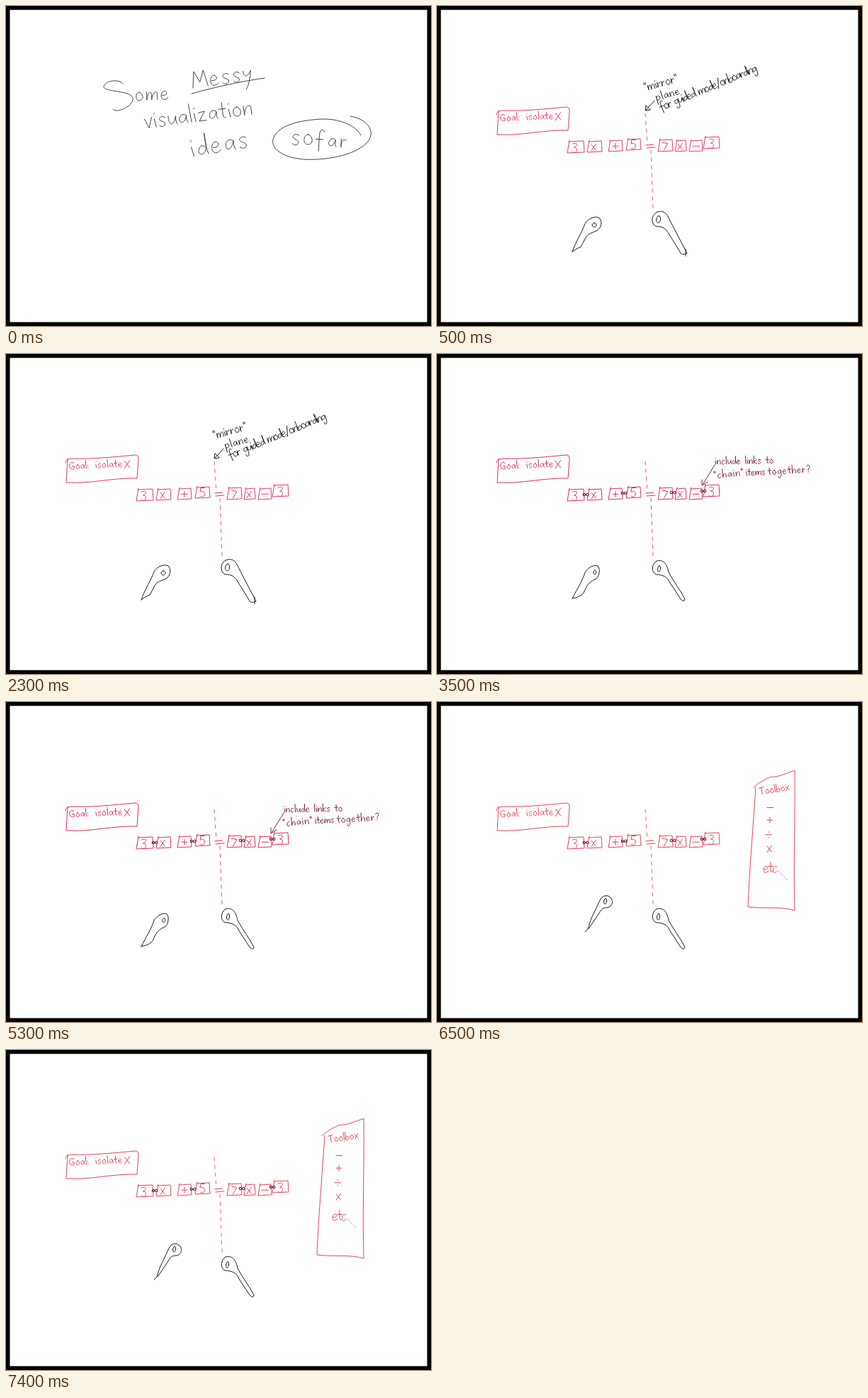
An HTML page for the animation above (8 s loop, 600 by 453 pixels).

```html
<!DOCTYPE html>
<html lang="en">
<head>
<meta charset="utf-8">
<title>Sketch slides</title>
<style>
  html, body { margin: 0; height: 100%; overflow: hidden; background: #000; }
  svg { display: block; width: 100%; height: 100%; }
  path { fill: none; stroke-linecap: round; stroke-linejoin: round; vector-effect: non-scaling-stroke; }
</style>
</head>
<body>
<svg id="stage" viewBox="0 0 600 453"></svg>
<script>
// Single-stroke handwriting: [width, path], baseline at 0, x-height 10.
const glyphs = {
  a: [8, 'M8-8C4-12 0-8 0-4S5 1 8-8Q7-1 9 0'],
  b: [8, 'M0-20V0C4 2 8-1 8-5S3-10 0-4'],
  c: [7, 'M7-9C2-12-1-5 1-1S5 0 7-2'],
  d: [8, 'M7-7C3-11 0-6 0-3S6 2 8-8V-20Q7-5 9 0'],
  e: [8, 'M1-5C5-4 8-6 6-9S-1-8 0-3S5 1 8-2'],
  f: [8, 'M9-17C6-22 3-18 3-12V6M-1-8H8'],
  g: [8, 'M8-8C4-12 0-8 0-4S6 0 8-8C8 4 7 9 4 9S0 7 1 5'],
  h: [8, 'M0-20V0C1-8 7-13 8-6V0'],
  i: [1, 'M0-9L1 0M0-14L1-15'],
  k: [7, 'M0-20V0M7-10L0-5L7 0'],
  l: [1, 'M0-20L1 0'],
  m: [13, 'M0-10V0C1-9 6-13 6-6V0C7-9 13-13 13-6V0'],
  n: [8, 'M0-10V0C1-9 8-14 8-6V0'],
  o: [8, 'M5-10C-1-11-2 0 4 0S9-9 4-10'],
  p: [8, 'M0-10V9M0-7C3-12 8-10 8-6S3 1 0-2'],
  r: [6, 'M0-10V0C0-7 3-11 6-8'],
  s: [7, 'M7-9C4-12 0-9 1-7S8-4 6-1S1 0 0-1'],
  t: [6, 'M3-17V-2Q4 1 6-1M-1-10H7'],
  u: [8, 'M0-10C-1 2 5 2 8-9Q7-1 9 0'],
  v: [7, 'M0-10L4 0L8-11'],
  x: [8, 'M0-10L8 0M8-11L0 1'],
  y: [8, 'M0-10C0-3 4-3 8-10Q6 2 1 9'],
  z: [8, 'M0-9L7-10L0 0H8'],
  G: [12, 'M11-14C7-20 0-15 0-8S7 2 11-1V-7H6'],
  M: [15, 'M0 0L3-17L8-5L13-17L16 0'],
  T: [12, 'M0-16L12-18M6-17V0'],
  3: [8, 'M0-15C4-18 9-16 8-13S4-9 3-9C9-9 9-4 7-1S2 1 0-1'],
  5: [8, 'M8-16H1L0-9C5-11 9-8 8-4S3 1 0-1'],
  7: [9, 'M0-14L10-12L3 0'],
  '+': [10, 'M0-6H10M5-11V-1'],
  '-': [12, 'M0-6H12'],
  '÷': [10, 'M0-6H10M5-11v1M5-2v1'],
  ':': [1, 'M0-8v1M0-1v1'],
  '/': [7, 'M0 3L7-18'],
  '"': [3, 'M0-17V-13M3-17V-13'],
  '?': [7, 'M0-14C1-19 8-18 7-13S3-9 3-5M3-1v1'],
  ' ': [6, '']
};

const line = (d, extra = '') => `<path d="${d}" ${extra}/>`;

function write(text, x, y, scale, gap = 6, angle = 0) {
  let pen = 0, out = '';
  for (const ch of text) {
    const [width, d] = glyphs[ch];
    if (d) out += line(d, `transform="translate(${pen} 0)"`);
    pen += width + gap;
  }
  return `<g role="img" aria-label='${text}' transform="translate(${x} ${y}) rotate(${angle}) scale(${scale})">${out}</g>`;
}

const ink = (color, ...parts) => `<g stroke="${color}" stroke-width="1">${parts.join('')}</g>`;
const eye = (x, y, rx, ry) => line(`M${x} ${y - ry}a${rx} ${ry} 8 1 0 .1 0`);
const link = (x, y) => line(`M${x} ${y}c-5-6-5 6 0 0c5-6 5 6 0 0`, 'stroke-width="1.2"');

// Box x, y, width, height, then the symbol with its left edge and baseline.
const tiles = [
  [185, 191, 22, 17, '3', 191, 207], [213, 191, 19, 16, 'x', 218, 204],
  [243, 190, 18, 16, '+', 248, 203], [268, 188, 19, 16, '5', 274, 202],
  [313, 189, 19, 17, '7', 318, 204], [337, 190, 14, 16, 'x', 340, 203],
  [357, 190, 17, 16, '-', 361, 203], [377, 185, 21, 17, '3', 384, 201]
];
const tile = ([x, y, w, h, symbol, left, base]) =>
  line(`M${x + 1} ${y + 1}L${x + w} ${y}L${x + w + 1} ${y + h - 1}L${x - 1} ${y + h}L${x + 2} ${y - 1}`) +
  write(symbol, left, base, .78);

const equation = color => ink(color,
  write('Goal:', 90, 163, .57, 4, -3), write('isolate', 127, 161, .57, 4.2, -2), write('x', 167, 161, .95),
  line('M84 154Q83 148 95 148C120 149 150 146 182 143Q187 142 187 149L185 176C150 175 120 184 85 182L87 148'),
  tiles.map(tile).join(''),
  line('M295 197L306 196M296 201L308 200'),
  line('M294 152L297 196M302 204L305 287', 'stroke-dasharray="5 6" stroke-opacity=".8"'));

const links = ink('#7c2040', link(210, 199), link(264, 197), link(333, 196), link(376, 194));

const title = ink('#444',
  line('M165 110C160 103 140 105 138 114C137 122 178 119 179 131C180 142 155 153 151 146'),
  write('ome', 184, 134, 1.15, 5, -3), write('Messy', 264, 116, 1.35, 4.3, -8),
  line('M262 124C295 115 330 107 365 102'),
  write('visualization', 197, 173, 1.3, 3.7, -7.5), write('ideas', 264, 213, 1.5, 5, -10),
  write('so', 404, 196, 1.4, 5), write('far', 438, 198, 1.2, 6.5, 3),
  line('M486 156C512 160 524 180 508 195C490 212 450 219 420 217C385 214 372 198 378 186C386 167 420 161 448 160C476 160 496 172 501 183'));

const mirror = equation('#e23a62') + ink('#1a1a1a',
  write('"mirror"', 295, 120, .68, 3.2, -16), write('plane', 311, 134, .62, 5, -17),
  write('for guided mode/onboarding', 317, 148, .68, 1, -22.5),
  line('M307 134L295 147M295 141L294 148L301 147Z'),
  line('M191 348C196 333 205 320 209 308C214 300 224 297 229 300C234 305 232 314 226 318C217 322 213 322 210 328L203 341C198 343 195 345 191 348'),
  eye(222, 310, 3, 3),
  line('M310 292C302 296 302 308 309 312C319 312 323 315 327 322L343 348Q345 354 353 350L330 306C326 297 322 287 310 292M351 344V354'),
  eye(313, 302, 3, 5));

const rightWand = line('M310 293C303 297 302 309 309 312C320 313 325 315 329 324L344 347Q349 352 350 347C343 333 333 321 327 309C325 299 321 290 310 293');

const chain = equation('#dc2f58') + links + ink('#7c2040',
  write('include links to', 393, 156, .55, 3.8, -1), write('"chain"', 392, 176, .58, 5.2, -6),
  write('items', 437, 172, .55, 3, -3), write('together?', 468, 171, .58, 4.5, -4),
  line('M392 157L375 185M374 178V186L382 181')) + ink('#1a1a1a',
  line('M191 346C197 334 206 320 209 309C213 303 220 298 227 300C231 305 229 314 225 318C217 321 212 326 209 334Q206 344 191 346'),
  eye(223, 309, 2, 3), rightWand, eye(314, 304, 2, 4.5));

const toolbox = equation('#e34558') + links + ink('#e34558',
  line('M450 121C446 180 441 240 439 290C460 293 485 289 505 295C503 230 506 160 505 97C490 102 480 107 471 106C460 111 453 115 447 121'),
  write('Toolbox', 456, 131, .56, 3.6, -9),
  write('-', 466, 154, .75), write('+', 466, 172, .8), write('÷', 464, 193, .85), write('x', 466, 212, .8),
  write('etc', 461, 241, .85, .7), line('M482 239L494 252', 'stroke-dasharray="1 3"')) + ink('#1a1a1a',
  line('M209 325C215 322 214 315 218 306L230 281C232 275 239 272 244 276C250 281 248 289 241 291C234 291 232 293 229 299L214 321'),
  eye(238, 282, 2, 4), rightWand, eye(313, 304, 2, 4.5));

const stage = document.getElementById('stage');
stage.innerHTML = '<rect x="5.5" y="5.5" width="589" height="442" fill="#fff"/>' +
  [title, mirror, chain, toolbox].map(s => `<g class="slide">${s}</g>`).join('');

const slides = stage.querySelectorAll('.slide');
const ends = [500, 3500, 6500, 8000];

function show(now) {
  const current = ends.findIndex(end => now % 8000 < end);
  slides.forEach((slide, i) => slide.style.display = i === current ? '' : 'none');
  requestAnimationFrame(show);
}
show(0);
</script>
</body>
</html>
```
